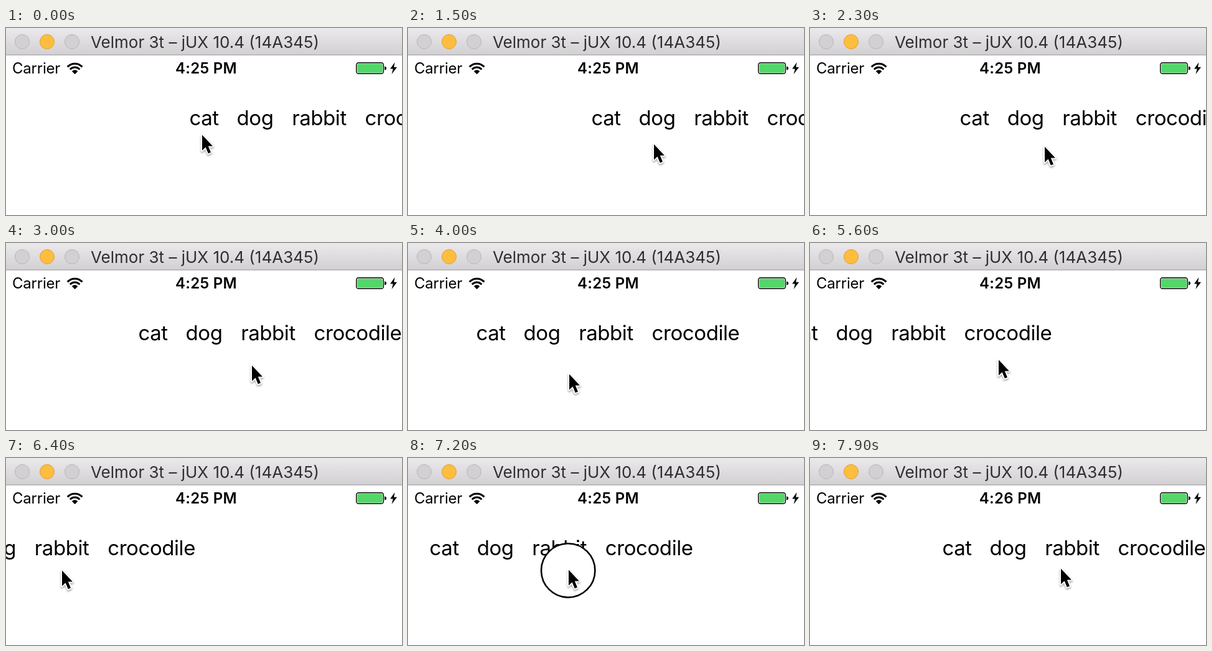
Write an HTML page that moves like this. It is 636x300 px and loops after 8000 ms.

```html
<!DOCTYPE html>
<html lang="en">
<head>
<meta charset="utf-8">
<title>Snapping word strip</title>
<style>
  html, body { margin: 0; width: 100%; height: 100%; overflow: hidden; background: #fff; }
  svg { display: block; width: 100vw; height: 100vh; font-family: Inter, "Liberation Sans", sans-serif; }
  .title { font-size: 26px; fill: #302e30; }
  .status { font-size: 24px; letter-spacing: -.2px; }
  .clock { font-size: 24px; font-weight: 600; letter-spacing: .3px; text-anchor: middle; }
  .words { font-size: 33px; letter-spacing: -.42px; text-anchor: middle; }
  .pointer { stroke: #fff; stroke-width: 4; stroke-linejoin: round; paint-order: stroke;
    filter: drop-shadow(0 2px 1.5px rgba(0, 0, 0, .35)); }
</style>
</head>
<body>
<svg viewBox="0 0 636 300">
  <defs>
    <linearGradient id="bar" x2="0" y2="1">
      <stop stop-color="#ebe9eb"/>
      <stop offset="1" stop-color="#d2d0d2"/>
    </linearGradient>
    <clipPath id="fan"><path d="M0 1-20-19V-34H20V-19Z"/></clipPath>
  </defs>
  <rect width="636" height="300" fill="#fff"/>

  <g id="strip" class="words"></g>

  <rect width="636" height="43" fill="url(#bar)"/>
  <rect y="42.5" width="636" height="1.5" fill="#b3b1b3"/>
  <g fill="#d3d0d3" stroke="#b9b6b9">
    <circle cx="26" cy="22" r="11.5"/>
    <circle cx="66" cy="22" r="11.5" fill="#fdbd3f" stroke="#e0a033"/>
    <circle cx="106" cy="22" r="11.5"/>
  </g>
  <text class="title" x="136" y="32">Velmor 3t – jUX 10.4 (14A345)</text>

  <text class="status" x="10" y="73">Carrier</text>
  <g transform="translate(110.6 73.2)" clip-path="url(#fan)" fill="none" stroke="#000" stroke-width="3.1">
    <circle r="16"/>
    <circle r="10.2"/>
    <circle r="3" stroke-width="6"/>
  </g>
  <text id="clock" class="clock" x="321.5" y="73"></text>
  <rect x="562.7" y="55.7" width="43.6" height="17.6" rx="3.5" fill="#fff" stroke="#000" stroke-width="1.4"/>
  <rect x="564.2" y="57.2" width="40.6" height="14.6" rx="2" fill="#53d769"/>
  <path d="M608 61.5q3 .5 3 3t-3 3z"/>
  <path d="M624.5 55 617 65.5h4.6L619.5 74l8.5-11.2h-5z"/>

  <g id="hand">
    <circle id="ring" cx="-.8" cy=".4" r="43.2" fill="#fff" stroke="#000" stroke-width="2.6"/>
    <path class="pointer" d="M0-.6V24.4L5.6 19.2 9.8 29.2 14 27.4 9.8 17.6H17Z"/>
  </g>
</svg>
<script>
  const LOOP = 8000, STEP = 100;
  const HOLD = 100, SETTLE = 260, GLIDE = 500; // ms
  const RUBBER = .45;

  // word: its centre before scrolling
  const words = { cat: 318, dog: 400, rabbit: 503, crocodile: 647 };

  const drags = [
    { press: 200, release: 900, from: [315, 172], to: [391, 187], word: "cat" },
    { press: 1800, release: 2300, from: [403, 188], to: [377, 191], word: "dog" },
    { press: 3300, release: 3700, from: [428, 207], to: [259, 211], word: "rabbit" },
    { press: 4500, release: 5000, from: [441, 192], to: [305, 192], word: "crocodile" },
    { press: 5900, release: 6400, from: [300, 182], to: [90, 181], word: "crocodile" },
    { press: 6800, release: 7500, from: [112, 182], to: [403, 178], word: "dog" }
  ];

  const $ = id => document.getElementById(id);
  const strip = $("strip"), hand = $("hand"), ring = $("ring"), clock = $("clock");

  for (const [word, x] of Object.entries(words)) {
    strip.innerHTML += `<text x="${x}" y="156">${word}</text>`;
  }

  const clamp = p => Math.min(1, Math.max(0, p));
  const progress = (t, start, end) => clamp((t - start) / (end - start));
  const smooth = p => p * p * (3 - 2 * p);
  const mix = (a, b, p) => a + (b - a) * p;
  const mixPoint = (a, b, p) => a.map((v, i) => mix(v, b[i], p));

  // Follow each drag, then glide to the start of the next one.
  function pointerAt(t) {
    let point = drags[0].from, free = 0;
    for (const { press, release, from, to } of drags) {
      const start = Math.max(free, press - GLIDE);
      point = mixPoint(point, from, smooth(progress(t, start, press)));
      point = mixPoint(point, to, smooth(progress(t, press + HOLD, release)));
      free = release;
    }
    return point;
  }

  // Centre the chosen word; a drag that stays on the same word only stretches.
  function scrollAt(t) {
    let centre = words.cat, stretch = 0, last = "cat";
    for (const { press, release, from, to, word } of drags) {
      const p = progress(t, press + HOLD, release + SETTLE);
      centre = mix(centre, words[word], smooth(p));
      if (word === last) stretch += RUBBER * (to[0] - from[0]) * Math.sin(Math.PI * p) ** 2;
      last = word;
    }
    return words.cat - centre + stretch;
  }

  function draw(now) {
    const t = Math.floor(now % LOOP / STEP) * STEP;
    const pressed = drags.some(d => t >= d.press && t < d.release);
    strip.setAttribute("transform", `translate(${scrollAt(t)} 0)`);
    hand.setAttribute("transform", `translate(${pointerAt(t).map(Math.round)})`);
    ring.setAttribute("visibility", pressed ? "visible" : "hidden");
    clock.textContent = t < 7900 ? "4:25 PM" : "4:26 PM";
  }

  const start = performance.now();
  function tick() {
    draw(performance.now() - start);
    requestAnimationFrame(tick);
  }
  tick();
</script>
</body>
</html>
```
